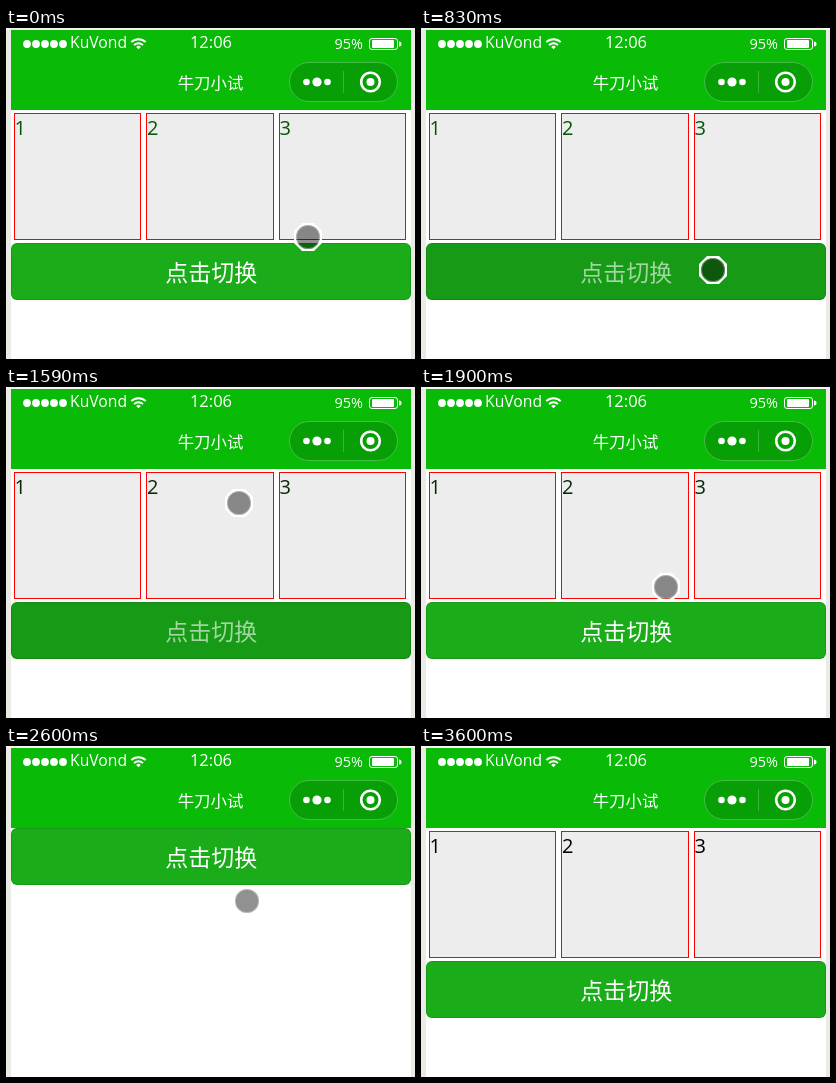
Animation of 409 by 331 pixels, one loop 4070 ms. Source, as an HTML page:

```html
<!DOCTYPE html>
<html lang="zh-CN">
<head>
<meta charset="utf-8">
<title>牛刀小试</title>
<style>
  html, body { margin: 0; width: 100%; height: 100%; overflow: hidden; background: #ebebe5; }
  svg { display: block; width: 409px; height: 331px; }
  text { font-family: "Open Sans", "Noto Sans", sans-serif; fill: #fff; }
  .cjk { font-family: "Noto Sans CJK SC", "Noto Sans CJK", sans-serif; text-anchor: middle; }

  #grid, #button, #face, #label, #cursor, .digit { animation: 4070ms step-end infinite; }
  #grid { animation-name: toggle; }
  #button { animation-name: shift; }
  #face { fill: #1aad19; animation-name: press; }
  #label { animation-name: dim; }
  #cursor { animation-name: wander; }
  .digit { font-size: 20px; animation-name: ink; }
  .cell { fill: #ededed; stroke: #f00; }

  @keyframes toggle {
    0%, 39.066%, 77.149% { visibility: visible; }
    22.113%, 58.23% { visibility: hidden; }
  }
  @keyframes shift {
    0%, 39.066%, 77.149% { transform: translateY(0); }
    22.113%, 58.23% { transform: translateY(-133px); }
  }
  @keyframes press {
    0%, 22.113%, 40.786%, 58.23%, 77.149% { fill: #1aad19; }
    20.393%, 39.066%, 56.511%, 75.184% { fill: #179b16; }
  }
  @keyframes dim {
    0%, 22.113%, 40.786%, 58.23%, 77.149% { fill-opacity: 1; }
    20.393%, 39.066%, 56.511%, 75.184% { fill-opacity: .6; }
  }
  @keyframes ink {
    0% { fill: #045804; }
    39.066% { fill: #062c06; }
    77.149% { fill: #000; }
  }
  @keyframes wander {
    0% { transform: translate(302px, 209px); }
    1.719% { transform: translate(302px, 203px); }
    3.439% { transform: translate(302px, 198px); }
    5.405% { transform: translate(302px, 196px); }
    7.125% { transform: translate(301px, 200px); }
    8.845% { transform: translate(299px, 212px); }
    10.565% { transform: translate(296px, 226px); }
    12.53% { transform: translate(293px, 238px); }
    14.25% { transform: translate(292px, 242px); }
    25.798% { transform: translate(280px, 216px); }
    27.764% { transform: translate(256px, 174px); }
    29.729% { transform: translate(245px, 148px); }
    31.695% { transform: translate(238px, 130px); }
    33.415% { transform: translate(234px, 120px); }
    35.38% { transform: translate(233px, 116px); }
    42.751% { transform: translate(234px, 128px); }
    44.717% { transform: translate(239px, 162px); }
    46.437% { transform: translate(245px, 200px); }
    48.402% { transform: translate(250px, 228px); }
    50.368% { transform: translate(251px, 236px); }
    60.196% { transform: translate(250px, 222px); }
    61.916% { transform: translate(246px, 190px); }
    63.882% { transform: translate(241px, 155px); }
    65.601% { transform: translate(238px, 132px); }
    67.567% { transform: translate(237px, 124px); }
    69.533% { transform: translate(237px, 121px); }
    73.218% { transform: translate(237px, 120px); }
    77.149% { transform: translate(240px, 126px); }
    78.869% { transform: translate(264px, 162px); }
    80.835% { transform: translate(294px, 202px); }
    82.8% { transform: translate(322px, 232px); }
    84.766% { transform: translate(355px, 270px); }
    86.486% { transform: translate(391px, 318px); visibility: visible; }
    88.452%, 100% { transform: translate(391px, 318px); visibility: hidden; }
  }
</style>
</head>
<body>
<svg viewBox="0 0 409 331">
  <rect width="409" height="331" fill="#ebebe5"/>
  <rect width="409" height="2" fill="#f6f6f3"/>
  <rect x="5" y="2" width="400" height="329" fill="#fff"/>
  <rect x="5" y="2" width="400" height="80" fill="#09bb07"/>

  <!-- status bar -->
  <path d="M21 16h36.1" stroke="#fff" stroke-width="7.8" stroke-linecap="round" stroke-dasharray="0 9"/>
  <text x="64" y="20" font-size="15.7">KuVond</text>
  <g fill="none" stroke="#fff" stroke-width="1.9">
    <path d="M125.3 14.2a10.2 10.2 0 0 1 14.4 0M128 17.1a6.4 6.4 0 0 1 9 0"/>
    <path d="M130.2 18.9a3.3 3.3 0 0 1 4.6 0L132.5 21.3z" fill="#fff" stroke="none"/>
  </g>
  <text x="205" y="20" font-size="16.5" text-anchor="middle">12:06</text>
  <text x="328.5" y="21" font-size="14.5">95%</text>
  <rect x="363.5" y="10.5" width="28" height="11" rx="2.5" fill="none" stroke="#fff"/>
  <rect x="366" y="12" width="22" height="8" rx="1" fill="#fff"/>
  <path d="M393 13.5q2.5 0 2.5 2.5t-2.5 2.5z" fill="#fff"/>

  <!-- title bar -->
  <text class="cjk" x="204.5" y="61.3" font-size="16.4">牛刀小试</text>
  <rect x="283.5" y="34.5" width="108" height="39" rx="19.5" fill="#089f06" stroke="#46bd45"/>
  <path d="M337.5 43v22" stroke="#3cb23a"/>
  <g fill="#fff">
    <circle cx="300.5" cy="54" r="3.3"/>
    <circle cx="311" cy="54" r="4.6"/>
    <circle cx="321.5" cy="54" r="3.3"/>
    <circle cx="364.5" cy="54" r="4"/>
    <circle cx="364.5" cy="54" r="9.3" fill="none" stroke="#fff" stroke-width="2.6"/>
  </g>

  <g id="grid">
    <rect class="cell" x="8.5" y="85.5" width="126" height="126"/>
    <rect class="cell" x="140.5" y="85.5" width="127" height="126"/>
    <rect class="cell" x="273.5" y="85.5" width="126" height="126"/>
    <text class="digit" x="8.5" y="107">1</text>
    <text class="digit" x="141" y="107">2</text>
    <text class="digit" x="273.5" y="107">3</text>
  </g>

  <g id="button">
    <rect id="face" x="5" y="215" width="400" height="57" rx="6"/>
    <rect x="5.5" y="215.5" width="399" height="56" rx="5.5" fill="none" stroke="#000" stroke-opacity=".12"/>
    <text id="label" class="cjk" x="205.3" y="252.6" font-size="23">点击切换</text>
  </g>

  <g id="cursor">
    <path fill="#fff" fill-rule="evenodd"
      d="M-6-14H6L14-6V6L6 14H-6L-14 6V-6ZM-12 0a12 12 0 0 0 24 0a12 12 0 0 0-24 0Z"/>
    <circle r="12" fill="#000" fill-opacity=".43"/>
    <circle r="11.6" fill="none" stroke="#fff" stroke-opacity=".35"/>
  </g>
</svg>
</body>
</html>
```
